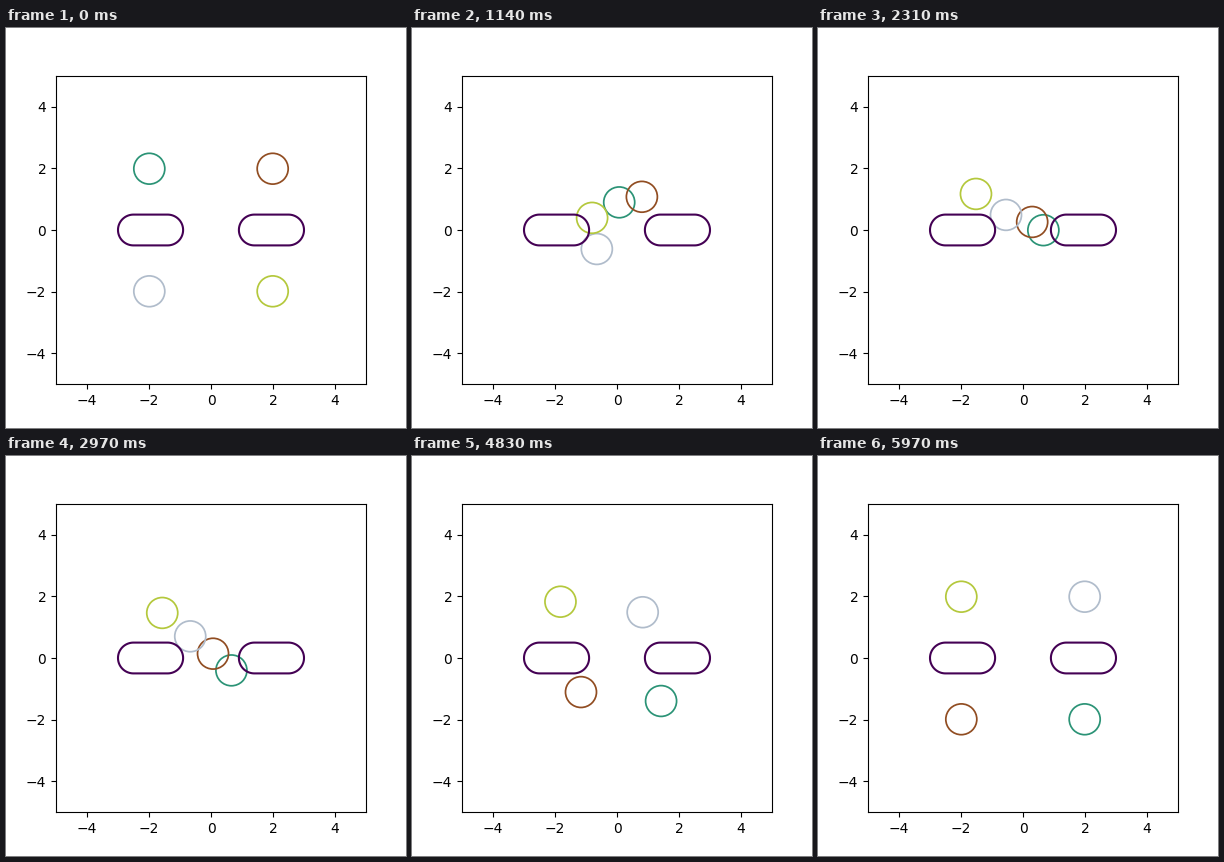
A matplotlib script for the animation above (6 s loop, 400 by 400 pixels).

```python
import numpy as np
import matplotlib.pyplot as plt
from matplotlib.animation import FuncAnimation

FRAMES = 200
INTERVAL = 30
RADIUS = 0.5
CORNER = 1.99

# Each agent crosses to the opposite corner at constant speed per leg,
# turning at three points around the gap between the obstacles.
TURNS = [0, 40, 60, 110, FRAMES - 1]
AGENTS = [
    ("#2b9376", (-1, 1), [(0.18, 0.84), (0.655, 0.30), (0.66, -0.60)]),
    ("#914d22", (1, 1), [(0.74, 1.03), (0.475, 0.355), (-0.05, 0.08)]),
    ("#b0bccb", (-1, -1), [(-0.58, -0.545), (-0.455, 0.325), (-0.73, 0.81)]),
    ("#b4c83c", (1, -1), [(-0.95, 0.52), (-1.475, 0.945), (-1.6, 1.61)]),
]


def capsule(x0, x1, r):
    """Outline points of a horizontal capsule around the segment x0..x1."""
    a = np.linspace(-np.pi / 2, np.pi / 2, 60)
    x = np.concatenate([x1 + r * np.cos(a), x0 - r * np.cos(a)])
    y = np.concatenate([r * np.sin(a), -r * np.sin(a)])
    return np.column_stack([x, y])


def route(side, via):
    start = CORNER * np.array(side)
    return np.vstack([start, via, -start])


def position(path, frame):
    return [np.interp(frame, TURNS, axis) for axis in path.T]


fig, ax = plt.subplots(figsize=(4, 4), dpi=100)
ax.set_xlim(-5, 5)
ax.set_ylim(-5, 5)

for x0, x1 in [(-2.5, -1.4), (1.4, 2.5)]:
    ax.add_patch(plt.Polygon(capsule(x0, x1, RADIUS), fill=False,
                             ec="#440154", lw=1.5, zorder=2))

paths = [route(side, via) for _, side, via in AGENTS]
circles = [
    ax.add_patch(plt.Circle(path[0], RADIUS, fill=False, ec=color, lw=1.25))
    for (color, _, _), path in zip(AGENTS, paths)
]


def update(frame):
    for circle, path in zip(circles, paths):
        circle.center = position(path, frame)
    return circles


anim = FuncAnimation(fig, update, frames=FRAMES, interval=INTERVAL,
                     repeat=True, repeat_delay=0)
plt.show()
```
